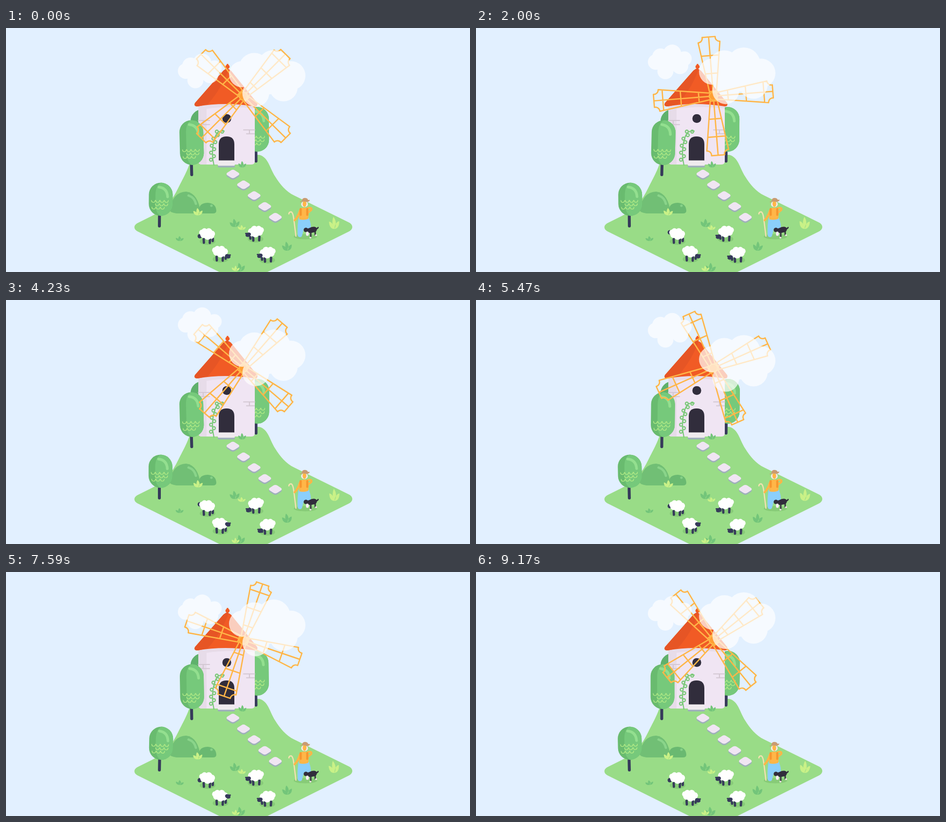
An HTML page for the animation above (9.27 s loop, 953 px wide and 504 px high).

```html
<!DOCTYPE html>
<html lang="en">
<head>
<meta charset="utf-8">
<title>Windmill meadow</title>
<style>
html, body { margin: 0; height: 100%; overflow: hidden; background: #e2f0ff; }
svg { display: block; width: 100vw; height: 100vh; }
.line { fill: none; stroke-linecap: round; stroke-linejoin: round; }
</style>
</head>
<body>
<svg id="stage" viewBox="0 0 953 504"></svg>
<script>
const LOOP = 9270, SWAY = 4000, DRIFT = 8800;
const NAVY = '#363a5a', DARK = '#312d3c', WALL = '#f0e5f3', SAIL = '#ffb648', SHADE = '#87cb77';
const LIGHT = '#c9f187', GREEN = '#73c57a', STONE = '#9eafba';
const LEFT = 150, FRONT = 1250, BACK = FRONT + SWAY / 2;
const swaying = [];

const line = (d, color, width) => `<path class="line" d="${d}" stroke="${color}" stroke-width="${width}"/>`;
const shape = (d, color) => `<path d="${d}" fill="${color}"/>`;
const oval = (x, y, rx, ry, color) => `<ellipse cx="${x}" cy="${y}" rx="${rx}" ry="${ry}" fill="${color}"/>`;
const box = (x, y, w, h, r, color) => `<rect x="${x}" y="${y}" width="${w}" height="${h}" rx="${r}" fill="${color}"/>`;
const circle = (x, y, r) => `<circle cx="${x}" cy="${y}" r="${r}"/>`;
const repeat = (count, draw) => Array.from({ length: count }, (_, i) => draw(i)).join('');

// Wraps content that leans around a fixed foot; leftAt is the time of the leftmost pose.
function sway(x, y, degrees, leftAt, content) {
  const id = 'sway' + swaying.length;
  swaying.push({ id, x, y, degrees, leftAt });
  return `<g id="${id}">${content}</g>`;
}

function tree(footX, footY, x, top, bottom, degrees, leftAt) {
  const r = 24.5;
  const leaves = repeat(3, row => repeat(row ? 3 : 4, i =>
    `M${x - 19 + (row % 2) * 8 + (row > 1) + i * 9} ${bottom - 32 + row * 7}c0 5.5 7.5 5.5 7.5 0`));
  return sway(footX, footY, degrees, leftAt,
    line(`M${footX} ${bottom - 8}V${footY - 3}`, NAVY, 6) +
    box(x - r, top, 2 * r, bottom - top, r, '#69bb6f') +
    shape(`M${x} ${top}a${r} ${r} 0 0 1 ${r} ${r}V${bottom - r}a${r} ${r} 0 0 1 -${r} ${r}q-11 -6 -11 -26V${top + 26}q0 -20 11 -26`, '#76c97b') +
    line(`M${x - 4} ${top + 9}q17 2 18 20`, '#93df8f', 5.5) +
    line(leaves, '#b4ec86', 1.4));
}

function grass(x, y, w, h, color, leftAt) {
  const sides = [-1, 1].map(s => `M0 0C${s * 0.8} 0 ${s} -.35 ${s} -.62C${s * 0.55} -.6 ${s * 0.15} -.4 0 0`).join('');
  const middle = 'M0 0C-.5 -.3 -.35 -.8 -.1 -1C.4 -.75 .5 -.3 0 0';
  return sway(x, y, 6, leftAt,
    `<g transform="translate(${x} ${y}) scale(${w / 2} ${h})">${shape(sides + middle, color)}</g>`);
}

function stone(i) {
  const slab = (dy, color) =>
    `<g transform="translate(${466 + i * 21.8} ${301.5 + i * 22.3 + dy}) scale(1 .65) rotate(45)">${box(-11, -11, 22, 22, 6, color)}</g>`;
  return slab(3, STONE) + slab(0, WALL);
}

function sheep(id, x, y, flip, facingAway) {
  const wool = repeat(7, i => {
    const a = i / 7 * 2 * Math.PI;
    return circle(10.5 * Math.cos(a), 5 * Math.sin(a), 6 + i % 3 * 0.6);
  });
  const head = facingAway
    ? oval(15, 0, 4.5, 4.5, NAVY)
    : `<g transform="translate(-16 5) rotate(-25)">${oval(0, 0, 5.8, 4.3, NAVY)}</g>` + line('M-16 3L-21 2.5', NAVY, 3);
  const headGroup = `<g id="${id}">${head}</g>`;
  return `<g transform="translate(${x} ${y}) scale(${flip} 1)">` +
    oval(-1, 14, 16, 7, SHADE) +
    line('M-12 8l.5 5M-6 9l.5 8M7 9l-.5 7.5', NAVY, 4.8) +
    (facingAway ? headGroup : '') +
    `<g fill="#fff" transform="translate(0 -2) rotate(-14)">${wool}${circle(0, 0, 8)}</g>` +
    (facingAway ? '' : headGroup) + '</g>';
}

function sailArm(turn) {
  const outer = turn % 180 ? 84 : 104;
  const half = r => 7 + (r - 8) * 0.14;
  const rungs = repeat(3, i => {
    const r = outer - i * 37;
    return `M${-half(r)} ${-r}H${half(r)}`;
  });
  return `<g transform="rotate(${turn})">` + line(
    'M-7 -8L-22.4 -112A9 9 0 0 0 -13.5 -122.5H13.5A9 9 0 0 0 22.4 -112L7 -8M0 -6V-122.5' + rungs, SAIL, 2.7) + '</g>';
}

const ground = () =>
  shape('M272 421C261 416 261 407 272 402L300 388C330 374 343 352 354 330C366 306 370 300 378 278L382 262H520C539 267 541 288 553 307C563 323 575 338 592 346L703 401C714 406 714 416 703 421L537 504H438Z', '#99dc87');

function mill() {
  const buds = repeat(10, i => {
    const u = i / 8, side = i % 2 ? 3 : -3;
    return `M${421 + 12 * u ** 3 + side} ${Math.max(214, 272 - 58 * u)}a3 3 0 1 0 6 0a3 3 0 1 0 -6 0`;
  });
  return shape('M395 155H511V275Q511 282 504 282H402Q395 282 395 275Z', WALL) +
    shape('M395 155H511V166Q455 160 412 167V282H402Q395 282 395 275Z', '#e7dce9') +
    line('M395 191H418M405 191V199M395 199.5H418M488 210.5H511M500 211V218M494 218.5H510', '#d3c7d2', 2.2) +
    shape('M388 155L446.5 88Q455 81 462 88L516 155Q518 162 511 162Q450 152 393 162Q385 162 388 155', '#f15b25') +
    shape('M388 155L446.5 88Q455 81 457 85Q445 122 414 158L393 162Q385 162 388 155', '#e65525') +
    oval(455, 80, 4.3, 4.3, '#f15b25') + box(453, 74, 4, 6, 2, '#f15b25') +
    box(444.5, 178, 18, 18, 8.5, DARK) +
    shape('M437 276V240Q437 224 453 224Q469 224 469 240V276Z', DARK) +
    box(435, 278, 35, 10, 2.5, STONE) + box(435, 273.5, 35, 11, 2, '#f0ebee') +
    line('M427 283C421 258 425 230 434 216Q440 212 448 213' + buds, '#7dc97b', 2.3);
}

const bushes = () =>
  shape('M336 376Q342 339 370 338Q395 341 400 383H350Q336 381 336 376', '#71bf75') +
  shape('M398 383Q392 362 414 361Q431 362 432 377Q432 383 425 383Z', '#6ab971') +
  line('M375 346Q387 350 390 363', '#8ad48a', 5) + oval(422, 367, 2.6, 2.6, '#85d088');

const shepherd = () =>
  oval(615, 431, 24, 5.5, SHADE) +
  line('M595.5 430L591 394Q589 378 584 380Q581 381 581 384', '#f5e1b0', 2.5) +
  shape('M601 392H622Q627 404 626 414H612L608 429Q607 432 604 432Q600 432 599 428Q598 408 601 392', '#8bcffb') +
  line('M604 377Q600 390 593 397', SAIL, 4.5) +
  line('M620 372Q629 370 627 376L621 381', SAIL, 4) +
  shape('M604 374Q606 371 613 371Q621 371 622 377L621 394Q612 398 602 395Z', SAIL) +
  box(603, 372, 4.5, 16, 2, '#f6972f') + box(616.5, 372, 4.5, 16, 2, '#f6972f') +
  `<g id="hat">${oval(613, 364, 7, 6, '#f5e7e9')}${oval(613, 363, 3.8, 6.5, SAIL)}` +
  shape('M607 358Q608 351 613 351Q619 351 620 355L624 355Q622 360 616 359Q610 357 604 360Q603 357 607 358', '#c99b72') + '</g>';

const dog = () =>
  line('M619 421v7M626 423v8M635 420v7', DARK, 2.8) +
  line('M625 433h.5M637 428h-.5', '#f5e1ec', 3.6) +
  shape('M616 415Q622 414 628 411Q637 409 639 415Q638 421 633 422Q625 424 618 423Z', DARK) +
  line('M636 414Q640 415 641 412', DARK, 2.4) +
  oval(616, 417, 4.6, 4.6, DARK) + oval(619, 425, 3, 4.5, '#f7edf6');

const cloud = (id, ...lobes) =>
  `<g id="${id}" fill="#fff" opacity=".7">${lobes.map(lobe => circle(...lobe)).join('')}</g>`;

document.getElementById('stage').innerHTML =
  ground() +
  box(379, 168, 49, 90, 24.5, '#5fb16c') +
  tree(513.5, 278, 516, 163, 255.5, 1, BACK) +
  mill() +
  tree(381.5, 306, 383, 190.5, 283, 1.5, LEFT) +
  bushes() +
  tree(315, 412, 317.3, 319.5, 388, 1.4, FRONT) +
  repeat(5, stone) +
  grass(485, 288, 16, 13, GREEN, FRONT) +
  grass(394.5, 387, 19, 15, LIGHT, BACK) +
  grass(470.5, 411, 20, 17, GREEN, LEFT) +
  grass(484, 417, 16, 10, LIGHT, FRONT) +
  grass(356.5, 440, 16, 10, GREEN, FRONT) +
  grass(674.5, 415, 21, 25, LIGHT, BACK) +
  grass(578, 460, 20, 19, GREEN, LEFT) +
  grass(481, 503, 21, 18, GREEN, LEFT) +
  grass(471.5, 502, 16, 11, LIGHT, FRONT) +
  sheep('awayHead', 413, 427, -1, true) +
  sheep('upperHead', 513.5, 422, 1) +
  sheep('rightHead', 439.5, 463.5, -1) +
  sheep('lowerHead', 537.5, 465.5, 1) +
  shepherd() + dog() +
  `<g id="sails">${repeat(4, i => sailArm(i * 90))}<circle r="8.5" fill="#ff9f33" stroke="${SAIL}" stroke-width="2.5"/></g>` +
  cloud('smallCloud', [369, 89, 16], [379, 78, 17], [403, 71.5, 18.5], [428, 82, 15], [419, 97, 17], [389, 108, 16.5], [398, 90, 18]) +
  cloud('bigCloud', [485, 95, 27], [510, 83, 32], [550, 79, 34], [585, 98, 30], [570, 122, 29], [513, 134.5, 27.5], [538, 106, 31]);

const move = (id, value) => document.getElementById(id).setAttribute('transform', value);
const swing = (t, leftAt) => -Math.cos((t - leftAt) / SWAY * 2 * Math.PI);
// Steady rise and fall over 41 pixels, highest at topAt.
const drift = (t, topAt) => Math.abs((t - topAt + DRIFT * 1.5) % DRIFT - DRIFT / 2) / (DRIFT / 2) * 41;
function ease(t, from, to) {
  const p = Math.min(1, Math.max(0, (t - from) / (to - from)));
  return p * p * (3 - 2 * p);
}

function draw(t) {
  move('sails', `translate(487.5 140.7) rotate(${44.8 + t * 0.0203})`);
  move('smallCloud', `translate(0 ${drift(t, 4135) - 38.6})`);
  move('bigCloud', `translate(0 ${drift(t, 1285) - 11.5})`);
  for (const s of swaying) move(s.id, `rotate(${s.degrees * swing(t, s.leftAt)} ${s.x} ${s.y})`);
  const graze = ease(t, 1400, 2500) - ease(t, 5700, 6900);
  move('upperHead', `translate(${graze} ${graze * 7})`);
  move('lowerHead', `translate(${graze} ${graze * 6})`);
  move('awayHead', `translate(0 ${3 - 8 * (ease(t, 200, 1000) - ease(t, 4800, 6200))})`);
  move('rightHead', `translate(0 ${3 - 8 * (ease(t, 1800, 4000) - ease(t, 7700, 8900))})`);
  move('hat', `rotate(${3 * swing(t, FRONT)} 613 370)`);
}

function tick() {
  draw(performance.now() % LOOP);
  requestAnimationFrame(tick);
}
tick();
</script>
</body>
</html>
```
